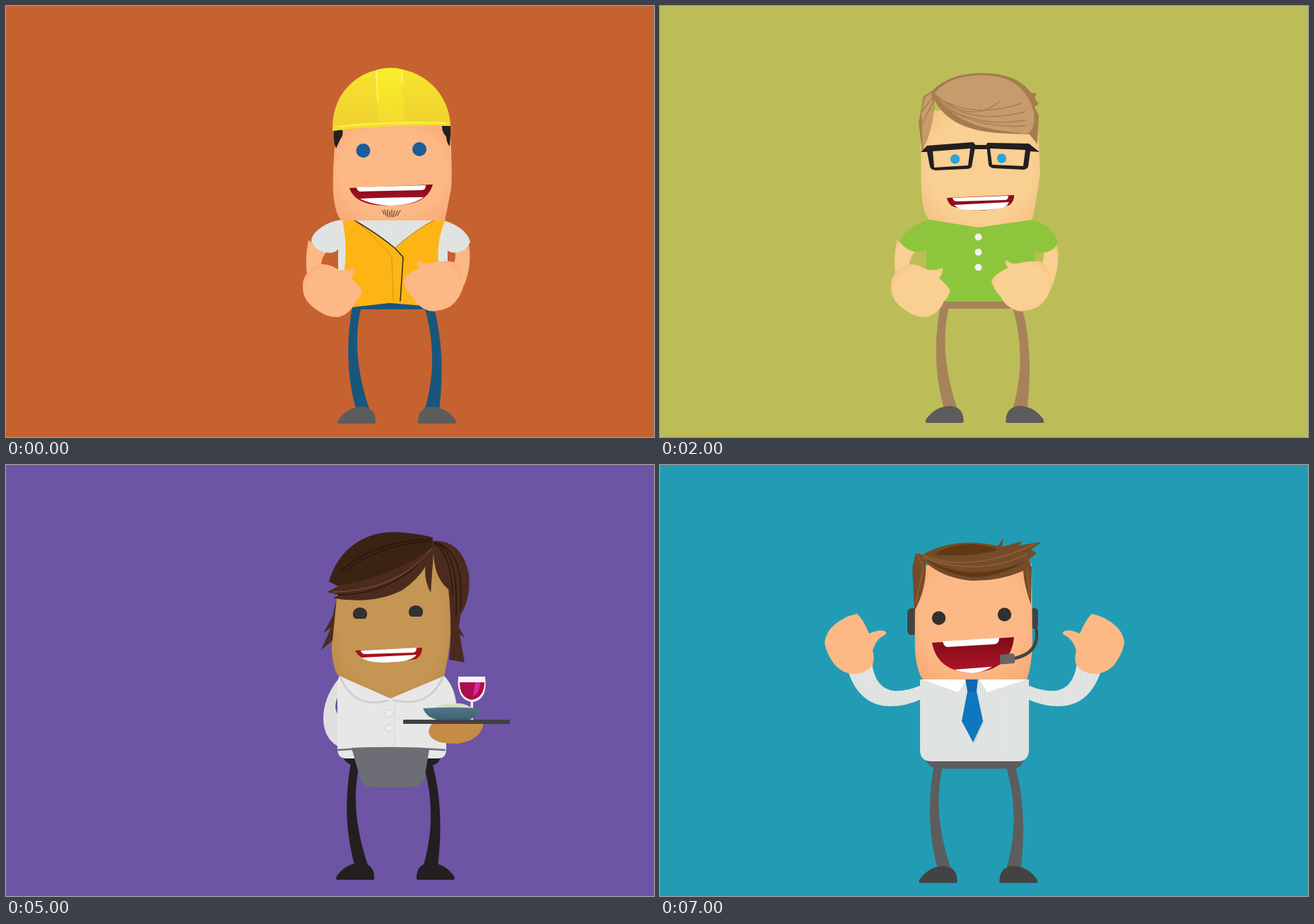
Recreate the animation shown at these times as an HTML page. Size 917x611 px, loop 8000 ms.

```html
<!DOCTYPE html>
<html lang="en">
<head>
<meta charset="utf-8">
<title>People at work</title>
<style>
  html, body { margin: 0; width: 100%; height: 100%; overflow: hidden; }
  svg { display: block; width: 100%; height: 100%; }
</style>
</head>
<body>
<svg id="stage" viewBox="0 0 917 611"></svg>
<script>
const ORANGE = '#c6622f', PURPLE = '#6e54a4', OLIVE = '#bcbd58', TEAL = '#229cb4';
const BLACK = '#231f20', BROWN = '#4a2b1e', DARK_BROWN = '#3a2312', GREY = '#5d5d5d', CHARCOAL = '#434343';
const STEP = 1000;

const path = (d, fill, extra = '') => `<path d="${d}" fill="${fill}" ${extra}/>`;
const line = (d, color, width = 1) =>
  `<path d="${d}" fill="none" stroke="${color}" stroke-width="${width}" stroke-linecap="round"/>`;
const rect = (x, y, w, h, fill, r = 0) =>
  `<rect x="${x}" y="${y}" width="${w}" height="${h}" rx="${r}" fill="${fill}"/>`;
const circle = (x, y, r, fill) => `<circle cx="${x}" cy="${y}" r="${r}" fill="${fill}"/>`;
const move = (x, content) => `<g transform="translate(${x} 0)">${content}</g>`;
const mirror = (axis, content) => `<g transform="translate(${2 * axis} 0) scale(-1 1)">${content}</g>`;
const eyes = (x1, y1, x2, y2, r, fill) => circle(x1, y1, r, fill) + circle(x2, y2, r, fill);
const skin = (id, inner, outer) =>
  `<radialGradient id="${id}" r=".72"><stop offset=".6" stop-color="${inner}"/><stop offset="1" stop-color="${outer}"/></radialGradient>`;
const fade = (id, top, bottom) =>
  `<linearGradient id="${id}" x2="0" y2="1"><stop stop-color="${top}"/><stop offset="1" stop-color="${bottom}"/></linearGradient>`;

const defs = `<defs>
  ${skin('peach', '#fcb985', '#f8a473')}${skin('cocoa', '#5f3a28', '#4b2a1b')}
  ${skin('cream', '#f9cf92', '#f3b779')}${skin('chestnut', '#6c4231', '#62382a')}
  ${skin('amber', '#c49553', '#b98541')}
  ${fade('helmet', '#f7e52c', '#efcf31')}${fade('stripe', '#f9ee2a', '#f3db2d')}
  ${fade('bowl', '#527690', '#3f606e')}${fade('mouth', '#7f0b18', '#b1152a')}
  <pattern id="cloth" width="3" height="3" patternUnits="userSpaceOnUse">
    ${rect(0, 0, 3, 3, '#e3e6e4')}${rect(0, 0, 1, 3, '#d9dddb')}
  </pattern>
</defs>`;

function legs(x, y, trousers, shoes, flip = 1) {
  const shoe = path('M-83 0Q-86-3-79-10Q-67-24-48-24Q-31-22-30-5Q-29 0-32 0Z', shoes);
  return `<g transform="translate(${x} ${y}) scale(${flip} 1)">` +
    path('M-74-173H64Q60-162 50-162H-56Q-68-162-74-173Z', trousers) +
    path('M-63-166C-71-120-72-70-57-18H-38C-56-70-61-120-51-162Z', trousers) +
    path('M40-162C52-120 55-70 39-18H60C66-70 65-120 52-166Z', trousers) +
    shoe + mirror(0, shoe) + '</g>';
}

// Teeth and lips: outline, upper row, lower row.
const smile = (lips, upper, lower, fill = 'url(#mouth)') =>
  path(lips, fill) + path(upper, '#fff') + path(lower, '#fff');

const hipArms = fill =>
  path('M428 332Q422 360 427 388L446 374Q444 358 456 346Z', fill) +
  path('M655 338Q660 366 648 397L632 368Q638 360 635 345Z', fill);

const hipHands = fill =>
  path('M420 400Q419 386 427 378Q437 365 449 366Q460 367 469 373Q480 377 493 371Q494 379 488 386Q499 395 504 404Q500 415 495 418Q488 437 470 441Q456 442 443 433Q420 419 420 400Z', fill) +
  path('M562 389Q569 378 586 371Q580 366 583 360Q592 368 603 364Q622 360 634 363Q647 375 648 395Q643 415 629 426Q610 435 598 432Q581 426 575 412Q564 401 562 389Z', fill);

const raisedArm = fill => path('M266 292C277 326 298 342 326 342Q348 342 370 332V312Q346 322 330 320Q304 316 300 280Z', fill);
const raisedHand = fill =>
  path('M233 251Q235 238 243 230Q260 214 279 211Q287 218 296 239Q308 233 317 235Q323 238 318 241Q306 246 301 263Q304 274 301 283Q291 297 271 296Q257 294 247 283Q234 265 233 251Z', fill);

function curls() {
  const top = [[263, 152], [268, 133], [278, 124], [288, 114], [301, 109], [312, 104], [325, 100], [341, 102], [357, 102],
    [371, 107], [386, 107], [396, 109], [409, 115], [422, 119], [430, 128], [439, 132], [440, 148], [439, 165], [433, 181]];
  return path('M272 179Q268 170 269 163' + top.map(([x, y]) => `A10 10 0 0 1 ${x} ${y}`).join('') +
    'Q428 178 428 157Q421 156 418 152Q410 154 404 148Q394 160 382 161Q374 161 370 158Q362 163 354 159Q332 156 315 144Q304 148 289 150Q289 173 279 178Z', BLACK);
}

const builder = () =>
  legs(553, 592, '#19567c', '#5c5c5c') + hipArms('url(#peach)') +
  path('M475 303C452 306 434 320 432 332Q437 348 457 350Q466 350 470 345V375H625V347Q631 351 641 349Q653 346 657 334Q651 314 620 304Z', 'url(#cloth)') +
  path('M476 303H493Q525 322 550 343Q580 317 605 303H622Q609 330 612 365V425H590L543 421L490 427Q480 400 479 374Q483 335 476 303Z', '#fdb515') +
  line('M493 304Q525 322 550 343L562 356L558 418', '#33290f', 1.5) +
  line('M493 304Q530 333 546 356L548 417', '#c18c1b', .8) + line('M550 343Q580 317 605 304', '#8c7331', .8) +
  hipHands('url(#peach)') +
  path('M468 170L465 200Q462 240 463 265Q466 297 475 304H621Q625 285 630 258Q632 230 628 165Z', 'url(#peach)') +
  path('M464 175h12q2 8-3 14l-6 13q-4-8-3-27Z', BLACK) + path('M617 170h12v12l-1 17q-5-6-5-14q-6-5-6-15Z', BLACK) +
  path('M462 177C461 120 500 96 524 91Q545 85 561 90C600 98 627 130 629 168Q545 166 462 177Z', 'url(#helmet)') +
  path('M523 91Q545 85 560 90L564 166H527Z', 'url(#stripe)') +
  line('M524 92L526 135M560 91L561 108', '#fdf693', 1.5) +
  path('M462 177Q462 170 470 169Q540 161 622 164Q629 165 629 170Q545 167 462 177Z', '#f3df2b') +
  line('M472 171Q545 163 622 166', '#fbf04d', 2) +
  eyes(505.5, 205, 585, 203, 10, '#1d5c98') +
  smile('M486 258L604 253Q596 284 543 283Q494 284 486 258Z', 'M496 257L594 254Q594 261 589 261L502 263Q497 263 496 257Z',
    'M501 273Q548 271 591 271Q575 283 543 283Q517 282 501 273Z') +
  line('M533 290l2 5M536 289l2 8M540 289v10M543 291v8M546 289v10M550 290l-2 9M554 290l-3 8M558 290l-4 7', '#3a2b22');

const greeter = () =>
  legs(346.5, 592, GREY, CHARCOAL, -1) + move(-93, raisedArm('#0d77bf') + raisedHand('url(#cocoa)')) +
  path('M425 304Q458 325 458 375L456 425H430V400Q439 385 438 365Q437 350 428 336Z', '#0d77bf') +
  path('M275 303H428V419H290Q275 419 275 404Z', '#0d77bf') +
  path('M278 303H360L346 320ZM360 303H425L373 321Z', '#23a9e1') + line('M360 304Q362 375 358 405', '#0b62a5') +
  rect(377, 327.5, 41, 19.5, '#fff') + rect(381, 333, 27, 5, '#8f8f8f') + rect(381, 340.5, 18, 2, '#8f8f8f') +
  path('M369 414Q388 416 398 409Q412 399 431 399Q443 399 449 404Q457 422 455 440Q451 462 440 471Q424 477 404 473Q389 470 382 462Q383 444 389 430Q370 426 369 414Z', 'url(#cocoa)') +
  path('M272 150Q268 220 268 255Q272 290 278 303H425Q434 292 436 262Q437 220 433 150Z', 'url(#cocoa)') + curls() +
  eyes(317, 211, 398, 214, 9.7, '#333132') +
  smile('M295 242L413 248Q403 281 357 280Q308 277 295 242Z', 'M308 243L404 248Q403 255 397 255L314 251Q308 250 308 243Z',
    'M322 272L387 275Q372 281 357 280Q337 279 322 272Z');

const glasses = () =>
  path('M369 207L378 198L443 193Q447 196 446 200L441 228Q439 231 434 231L390 233Q383 232 382 228L378 207ZM386 206L439 202L436 226L388 229Z' +
    'M462 196Q463 193 466 194L522 195L537 207L524 206L521 228Q519 232 513 232L472 230Q466 229 465 225ZM467 202L517 204L514 227L470 225Z',
    BLACK, 'fill-rule="evenodd"') + rect(443, 197, 22, 6, BLACK);

const student = () =>
  legs(459.5, 591, '#a7825a', '#5c5c5c') + move(-93, hipArms('url(#cream)')) +
  path('M370 150Q368 250 371 275Q374 298 382 304L451 318L527 303Q534 270 538 235L535 170L500 140Z', 'url(#cream)') +
  path('M381 303L451 314L527 303Q553 310 563 333Q560 348 540 350Q533 349 531 347V419H377V345Q372 349 363 349Q345 345 339 333Q350 312 381 303Z', '#8dc63c') +
  [327.5, 349, 370.5].map(y => circle(450.5, y, 5, '#f1f2f2')).join('') + move(-93, hipHands('url(#cream)')) +
  path('M371 206L366 165L373 128L384 121Q410 95 455 95Q505 95 525 123L533 124L530 130L536 139L530 143L536 155L534 196L523 182C480 180 415 184 388 133Q388 170 371 206Z', '#a67c4f') +
  path('M388 124Q410 98 455 98Q515 98 529 150Q531 173 522 180Q514 183 508 180C470 175 420 172 388 124Z', '#c69c6c') +
  path('M372 203L370 150L375 129L384 123Q388 140 386 155Q383 177 372 203Z', '#c69c6c') +
  line('M388 124Q440 170 481 135M389 127Q440 162 512 138M391 130Q440 170 516 150M395 136Q445 174 517 162M400 142Q450 174 516 170M387 128L370 150M386 137L371 167', '#a67c4f', 1.4) +
  eyes(417.5, 217, 483.5, 216, 6.7, '#2ba5d8') + glasses() +
  smile('M406 272L501 268Q502 275 495 282Q470 291 446 290Q422 288 412 283Q407 278 406 272Z',
    'M414 272L493 269Q493 275 488 275L420 277Q415 277 414 272Z', 'M416 282L494 278Q490 286 480 287Q450 292 424 288Z', '#8e0e1c');

const volunteer = () =>
  legs(371.5, 588, '#454545', '#a3a8a6', -1) +
  path('M275 380Q288 370 306 366L322 388L302 414Q285 397 275 380ZM444 368Q463 368 480 379L466 405L436 382Z', 'url(#chestnut)') +
  path('M300 150Q292 225 293 245Q297 290 304 300L378 334L451 299Q459 285 461 255Q460 220 455 175Z', 'url(#chestnut)') +
  path('M304 299L371 324L378 331L386 324L450 299Q488 318 488 362L487 375L444 364L440 383L388 416L310 387L306 365L266 375Q258 322 304 299Z', '#14a99d') +
  path('M266 376Q285 360 306 361L307 368Q287 370 271 382ZM445 360Q470 361 487 375L484 381Q465 368 444 367Z', '#f4f5f5') +
  line('M309 334Q305 340 307 346M436 334Q438 340 437 346', '#0a6660', 1.4) +
  path('M300 414Q300 395 317 386Q340 383 361 391Q377 397 383 404Q384 413 380 423Q375 441 366 450Q356 454 343 452Q322 447 308 435Q300 425 300 414Z', 'url(#chestnut)') +
  path('M386 398Q399 399 405 393Q420 379 434 377Q446 377 452 384Q464 392 467 406Q467 425 460 435Q448 451 430 453Q411 451 400 442Q388 432 384 421Q391 412 393 407Q387 404 386 398Z', 'url(#chestnut)') +
  path('M262 118Q262 95 285 83Q310 72 328 73Q345 78 351 93L330 112L273 143Q262 130 262 118Z', DARK_BROWN) +
  path('M452 183L457 197L465 211L455 206Z', BROWN) +
  path('M322 103C345 90 380 90 400 93Q450 110 467 162L460 170L470 177L456 181L463 186Q370 197 328 152Q320 172 304 185L296 225L288 250L287 232L274 243L282 210Q265 180 269 150Q275 112 322 103Z', BROWN) +
  path('M322 103Q345 90 380 92C430 95 456 130 467 162Q430 158 390 140Q355 120 322 108Z', DARK_BROWN) +
  line('M322 106Q272 125 275 175M321 108Q282 135 281 180M320 110Q290 145 286 205M318 113Q310 130 300 142L297 165M323 108Q380 158 458 163M322 112Q365 170 455 172M324 104Q370 100 440 148', '#2b150b', 1.5) +
  line('M322 113Q345 158 410 177M322 118Q345 162 395 178L466 177', '#77492a', 1.4) +
  eyes(346, 216, 415, 213, 9.6, '#49332b') +
  smile('M336 261L434 257Q430 288 386 288Q346 287 336 261Z', 'M347 261L427 257Q427 263 422 263L353 266Q348 266 347 261Z',
    'M360 283L414 280Q402 288 386 288Q370 287 360 283Z');

const meal = () =>
  path('M640 300H678Q682 333 660 336Q637 333 640 300Z', '#f6f3f5') +
  path('M642 308H677Q677 330 659 333Q642 330 642 308Z', '#ac0d4f') + path('M664 308H671Q671 322 661 328Z', '#df25a4') +
  rect(657.5, 335, 3.5, 26, '#eeecef') +
  path('M607 345Q616 337 630 339Q646 335 660 345Z', '#d9dcc0') +
  path('M590 345Q632 342 673 345Q668 360 650 361H610Q595 358 590 345Z', 'url(#bowl)') +
  path('M598 378Q600 368 604 366H676Q672 390 640 395Q600 396 598 378Z', '#c68c45') + rect(562, 361, 151, 6, '#414143', 1);

const waiter = () =>
  legs(551, 588, BLACK, BLACK) +
  path('M470 304Q449 330 449 360Q450 388 470 399L474 360Q466 350 466 342Q467 330 474 322Z', '#dfdfe0') +
  path('M470 170Q461 230 461 265Q464 295 472 300L544 334L620 299Q627 270 629 240L628 150L590 110Z', 'url(#amber)') +
  path('M472 299L544 331L620 299Q636 315 638 345L623 362V405Q622 416 612 416H480Q470 415 469 405V306Z', '#e7e7e8') +
  line('M474 302Q492 346 540 334M618 301Q598 346 548 333', '#cfcfd1', 3) + line('M550 334V399', '#d3d3d5') +
  [352, 373].map(y => `<circle cx="542" cy="${y}" r="5" fill="#eee" stroke="#d0d0d2"/>`).join('') +
  line('M470 404Q545 398 621 404', '#6d6e75', 2.5) +
  path('M489 401Q545 398 599 403L592 445Q588 456 570 457H520Q505 456 502 447Z', '#6d6e75') +
  path('M468 188L462 215L449 238L460 231L446 262L462 249Z', BROWN) +
  path('M600 108Q645 103 655 155Q658 190 643 213L641 230L649 245L642 240L649 280L627 276Q632 230 626 176Q606 160 605 125L601 181Q587 155 598 126Z', BROWN) +
  path('M454 180L470 172C520 160 570 140 604 105Q604 148 560 178Q520 198 463 189L470 184Z', BROWN) +
  path('M457 165C470 120 505 95 550 95Q585 97 604 103L602 117C565 147 520 161 470 172Z', DARK_BROWN) +
  line('M474 150Q520 108 602 105M480 150Q530 112 601 108M605 110Q641 118 637 215M607 110Q650 120 643 205M606 112Q630 125 632 185M470 184Q550 184 600 122', '#2b150b', 1.5) +
  line('M462 180Q555 178 602 119', '#77492a', 1.5) +
  path('M491 212A10 9 0 0 1 511 210Q511 216 508 218H495Q491 217 491 212ZM570 209A10 9 0 0 1 590 207Q590 213 587 215H574Q570 214 570 209Z', '#333132') +
  smile('M494 263L589 259Q589 270 580 275Q550 281 530 280Q500 277 494 263Z', 'M502 263L581 259Q581 265 576 266L508 268Q503 268 502 263Z',
    'M503 273L581 269Q575 277 555 279Q515 283 503 273Z', '#a5101c') + meal();

const agent = () => {
  const arm = raisedArm('url(#cloth)') + raisedHand('#fcb985');
  return legs(450.5, 592.5, GREY, CHARCOAL) + arm + mirror(445, arm) +
    path('M368 304H522V404Q522 420 506 420H384Q368 420 368 404Z', 'url(#cloth)') +
    path('M371 304H434L422 322ZM452 304H519L463 322Z', '#fff') +
    path('M435 323H449L458 365L444 396L428 365Z', '#c6cbcb') +
    path('M432 303H450L448 321H435Z', '#0d68b0') + path('M435 321H448L457 363L443 393L427 363Z', '#0d77bf') +
    rect(350, 203, 14, 38, CHARCOAL, 6) + rect(522, 203, 13, 29, CHARCOAL, 5) +
    path('M362 145Q360 230 361 265Q364 295 372 304H519Q526 285 527 255L526 140L440 130Z', 'url(#peach)') +
    path('M360 207L357 145L362 125L372 127Q400 110 440 110Q465 111 478 115L486 104L484 116L513 108L508 114L540 109L525 120L533 125L522 134L526 145L525 198Q515 170 514 150Q480 165 440 164Q400 160 376 138Q378 175 360 207Z', '#754c29') +
    path('M388 127Q410 112 440 112Q470 114 478 121Q430 132 388 127Z', '#603813') +
    path('M376 133Q440 170 518 136Q480 160 440 159Q400 154 376 133Z', '#603813') +
    line('M372 128Q440 155 530 112M372 131Q450 160 520 126M364 128L373 145L362 195M520 148L523 185', '#946136', 1.5) +
    eyes(394.5, 217, 487.5, 212, 9.7, '#303030') +
    smile('M385 252L501 244Q497 292 440 295Q392 292 385 252Z', 'M400 250L480 245Q480 253 474 254L407 258Q402 258 400 250Z',
      'M417 290L470 286Q455 295 440 295Q425 294 417 290Z') +
    line('M532 230Q539 266 502 274', CHARCOAL, 4.5) + `<g transform="rotate(-5 491 275)">${rect(481, 268, 21, 14, '#666', 3)}</g>`;
};

const scenes = [
  [ORANGE, builder], [PURPLE, greeter], [OLIVE, student], [TEAL, agent],
  [ORANGE, volunteer], [PURPLE, waiter], [OLIVE, student], [TEAL, agent]
];

const stage = document.getElementById('stage');
stage.innerHTML = defs + scenes.map(([color, draw]) =>
  `<g class="scene" visibility="hidden">${rect(0, 0, 917, 611, color)}${draw()}</g>`).join('');
const layers = [...stage.querySelectorAll('.scene')];

const start = performance.now();
function render(now) {
  const current = Math.floor(Math.max(0, now - start) / STEP) % layers.length;
  layers.forEach((layer, i) => layer.setAttribute('visibility', i === current ? 'visible' : 'hidden'));
  requestAnimationFrame(render);
}
render(start);
</script>
</body>
</html>
```
